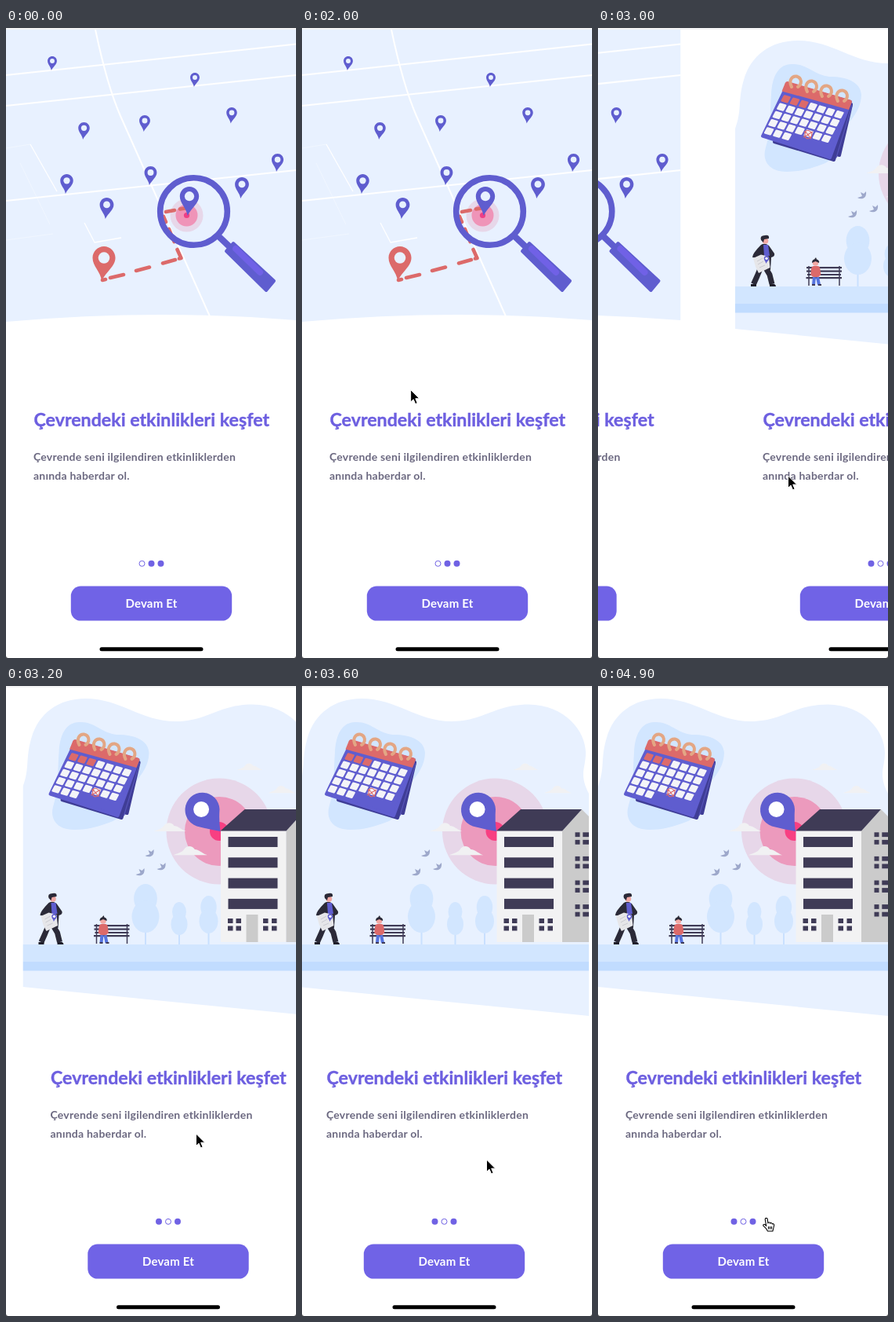
Animation, 370 px wide and 802 px high, one loop 5 s. Source, as an HTML page:

```html
<!DOCTYPE html>
<html lang="tr">
<head>
<meta charset="utf-8">
<title>Onboarding</title>
<style>
html, body { margin: 0; width: 100%; height: 100%; overflow: hidden; background: #fff; }
svg { display: block; }
text { font-family: Lato, "Open Sans", sans-serif; font-weight: 700; }
</style>
</head>
<body>
<svg id="stage" width="370" height="802" viewBox="0 0 370 802"></svg>
<script>
const LOOP = 5000, STEP = 100, GAP = 439.5;
const BLUE = '#5f5dcf', RED = '#dc6a6a', SKY = '#e8f1ff', PALE = '#d2e6ff', INK = '#3f3b56', BLACK = '#2b2a38';

const path = (d, fill) => `<path d="${d}" fill="${fill}"/>`;
const line = (d, color, width, cap = 'butt') =>
  `<path d="${d}" fill="none" stroke="${color}" stroke-width="${width}" stroke-linecap="${cap}" stroke-linejoin="round"/>`;
const circle = (x, y, r, fill) => `<circle cx="${x}" cy="${y}" r="${r}" fill="${fill}"/>`;
const rect = (x, y, w, h, fill, r = 0) =>
  `<rect x="${x}" y="${y}" width="${w}" height="${h}" rx="${r}" fill="${fill}"/>`;
const at = (x, y, body, scale = 1) => `<g transform="translate(${x} ${y}) scale(${scale})">${body}</g>`;

// Map pin: centre x, top y, full height
function pin([x, top, h], fill = BLUE, hole = SKY) {
  const r = h / 3.03;
  return at(x, top + r,
    path('M0 -1C.55 -1 1 -.55 1 0C1 .75 .2 1.2 -.2 2.03C-.3 1.2 -1 .75 -1 0C-1 -.55 -.55 -1 0 -1Z', fill) +
    circle(0, 0, 0.5, hole), r);
}

function mapArt() {
  const pins = [[59, 36, 18], [241, 57, 18], [288, 101, 20.5], [177, 111, 21], [99.5, 120, 22],
    [346.5, 160, 23], [184.5, 176, 24], [77.5, 186, 25], [301, 190, 27], [128.5, 216, 27]];
  return path('M0 0H370V372Q190 357 0 374Z', SKY) +
    line('M0 60L370 20.5M0 99L370 60M0 220L370 181', '#fff', 2) +
    line('M114 2C122 40 132 80 146 112L260 367', '#fff', 2) +
    line('M31 148L65 208M100 248L113 273L147 267', '#fff', 1.3) +
    `<g opacity=".35">${line('M0 153L31 148M18 172L56 250M0 270L60 262', '#fff', 1)}</g>` +
    pins.map(p => pin(p)).join('') +
    circle(230.5, 238.5, 21, '#e7d7e9') + circle(230.5, 238.5, 14, '#ef94b8') +
    line('M123 321L127 320M133 318L150 314M166 309L183 304.5M200 299.5L216 295M221 293.5L223.5 293L218.5 282' +
      'M214.5 272L208 256M204 247L201 240M204 234L215 232M222 230.5L229 229.5', RED, 4.6, 'round') +
    circle(230.5, 238.5, 3.6, '#ee3f86') +
    pin([234, 202, 37]) + pin([125, 278, 44], RED) +
    line('M269 263L290 283', BLUE, 8) +
    `<circle cx="239.5" cy="233.5" r="42.8" fill="none" stroke="${BLUE}" stroke-width="7.6"/>` +
    `<path d="M281 284L290 274L342 322L332 334Z" fill="${BLUE}" stroke="${BLUE}" stroke-width="4" stroke-linejoin="round"/>` +
    line('M293 281L324 311', '#7061e6', 8, 'round');
}

function calendar() {
  let cells = '';
  for (let row = 0; row < 5; row++)
    for (let col = 0; col < (row < 4 ? 7 : 3); col++)
      cells += rect(col - 0.4, row - 0.4, 0.8, 0.8, row === 0 && col < 3 ? RED : '#f4f4f8', 0.1);
  const ring = line('M-5 6C-9 -2 -5 -8 1 -7.5C8 -6 9 2 3 6', '#e3a684', 4, 'round');
  const sheet = (d, c) => `<path d="${d}" fill="${c}" stroke="${c}" stroke-width="4" stroke-linejoin="round"/>`;
  return path('M72 46C92 45 100 60 120 62C145 62 160 70 161 85C160 110 143 118 137 135C133 150 132 163 115 172' +
      'C95 180 80 183 66 183C42 183 34 168 39 152C46 130 44 110 46 85C47 62 55 46 72 46Z', PALE) +
    sheet('M70 74L148 98L133 162L60 142Z', '#3f3d96') +
    sheet('M70 74L148 97L126 168L50 145Z', '#3f3d96') +
    line('M149 98L129 165', '#5654b8', 1.2) +
    sheet('M67 71L147 94L121 165L35 137.5Z', BLUE) +
    path('M67 68Q64 68 63 72L59.5 80.5L145 104L149 94Q149 92 147 91.5Z', RED) +
    `<g transform="matrix(11.3 3.3 -5.4 10.25 64.7 90.3)">${cells}</g>` +
    line('M87 139L99 132M89 131L97 141M88 133Q93 127 98 134Q98 141 92 141Q87 139 90 132', RED, 1.2) +
    [[77, 69], [97, 75], [116, 81], [136, 87]].map(([x, y]) => at(x, y, ring)).join('');
}

function building() {
  const wall = '#cbcbcb';
  let s = path('M252.5 184H336V326H252.5Z', '#f2f2f3') +
    path('M336 184L361 157L370 166V326H336Z', wall) +
    path('M252 184.5L283 157H361L336 184.5Z', INK) + rect(285, 291, 15, 35, wall);
  for (let i = 0; i < 4; i++) {
    s += rect(262, 192 + i * 26.3, 63, 13, INK);
    for (const dy of [0, 9.6])
      s += rect(352.5, 186.3 + i * 30.6 + dy, 6, 5.8, INK) + rect(362.3, 186.3 + i * 30.6 + dy, 7.7, 5.8, INK);
  }
  for (const x of [261.5, 272, 306.5, 317.5])
    for (const y of [296, 305.5]) s += rect(x, y, 6.5, 6, INK);
  return s;
}

function tree(x, top, bottom, half) {
  const h = bottom - top, e = (cy, rx, ry) => `<ellipse cx="${x}" cy="${cy}" rx="${rx}" ry="${ry}" fill="${PALE}"/>`;
  return line(`M${x} ${top + h / 2}V329`, '#c9e0ff', 2) +
    e(top + h * 0.3, half * 0.85, h * 0.3) + e(top + h * 0.67, half, h * 0.33);
}

function walker() {
  return line('M33 304L28 316L23.5 326', BLACK, 7) + line('M38 304L44 314L47 326', BLACK, 7) +
    path('M20 326H27V329H20ZM44 326H50Q52 327 52 329H44Z', '#1f1e2a') +
    path('M33 276Q38 273 43 277L50 287Q51 291 46 292L45 308H29Q28 298 30 293L22 292Q22 287 33 276Z', BLACK) +
    path('M36 276L42 276L44 290H37Z', BLUE) +
    circle(38.5, 271, 3.8, '#f2a9a4') +
    path('M33 270Q31 264 38 264Q44 263 43 268L37 269L36 273Z', BLACK) +
    path('M23 293L33 288.5L43 291L44.5 305L30 312L26 304Z', '#e6e6e9') +
    line('M28 297L35 293M29 301L36 297M31 305L38 302', '#c9c9d0', 1) +
    pin([40, 290, 10], BLUE, '#fff');
}

function bench() {
  return rect(91, 304, 45, 2.2, INK) + rect(91, 308.5, 45, 2.2, INK) + rect(92, 313, 43, 2, INK) +
    rect(90.5, 317, 45.5, 2.2, INK) +
    line('M94 303V328M133 303V328', INK, 1.5) +
    line('M101 317L100 327M105 317L107 327', '#5674de', 4) +
    rect(97.5, 303, 10.5, 14, RED, 3) + line('M98.5 306L97.5 314M107 306L108 314', RED, 2.5, 'round') +
    circle(102.5, 299, 3.8, '#f2a9a4') +
    path('M98 299Q98 295 101 294.5L103 292L104 294.5Q108 296 107 299L102.5 297Z', BLACK) +
    rect(98, 326, 4, 2, INK) + rect(106, 326, 4, 2, INK);
}

function cityArt() {
  const cloud = path('M-20 5C-13 2 -10 2 -7 -2C-4 -7 3 -7 6 -2C11 -2 14 2 21 5Z', '#f1f1f3');
  const bird = path('M-6 3Q-2 2 0 1L-2 -4L2 -2L5 -5Q6 2 1 4Q-3 5 -6 3Z', '#9da8cb');
  return path('M0 383V128C9 105 3 92 11 66C20 35 45 16 80 16C125 16 150 45 195 45C235 45 250 23.5 293 23.5' +
      'C340 24 366 58 366 85C366 105 357 112 370 137V420Z', SKY) +
    calendar() +
    circle(250.5, 185, 67.5, '#e7d7e9') + circle(250.5, 185, 44, '#ec9abd') + circle(250.5, 185, 12, '#f83f82') +
    at(187, 180, cloud) + at(213, 210, cloud, 1.05) + at(289, 103, cloud, 0.8) + at(330, 132, cloud, 0.85) +
    [[162, 213], [150, 237], [177, 230]].map(([x, y]) => at(x, y, bird)).join('') +
    path('M252 185Q236 182 226 179.5A22 22 0 1 1 251 157Q250 172 252 185Z', BLUE) + circle(227.6, 157, 10, '#fff') +
    tree(156.5, 252, 314, 17.5) + tree(199.5, 275, 317, 10.5) + tree(237, 267, 315, 12) +
    rect(0, 329, 370, 22, PALE) + rect(0, 351, 370, 11.5, '#c1dcff') +
    building() + walker() + bench();
}

function page(id, art, current) {
  const label = (x, y, size, fill, str, extra = '') =>
    `<text x="${x}" y="${y}" font-size="${size}" fill="${fill}" ${extra}>${str}</text>`;
  const dots = [0, 1, 2].map(i => i === current
    ? `<circle cx="${173.5 + 12 * i}" cy="681.8" r="3.5" fill="#fff" stroke="#7062e4"/>`
    : circle(173.5 + 12 * i, 681.8, 4, '#7062e4')).join('');
  return `<svg id="${id}" width="370" height="802">${art}` +
    label(35.5, 506.5, 23.2, '#6d5fe0', 'Çevrendeki etkinlikleri keşfet', 'stroke="#6d5fe0" stroke-width=".4"') +
    label(35, 551.3, 14, '#6b6880', 'Çevrende seni ilgilendiren etkinliklerden', 'letter-spacing=".22"') +
    label(35, 575.3, 14, '#6b6880', 'anında haberdar ol.', 'letter-spacing=".22"') +
    dots + rect(82.8, 710.6, 205.4, 44, '#7063e6', 12.5) +
    label(185.5, 738.3, 15, '#fff', 'Devam Et', 'text-anchor="middle" letter-spacing=".2"') +
    rect(119.5, 788.3, 132, 5, '#000', 2.5) + '</svg>';
}

const $ = id => document.getElementById(id);
$('stage').innerHTML = page('first', mapArt(), 0) + page('second', cityArt(), 1) +
  rect(0, 0, 370, 2, '#f3f3f4') + path('M0 799.5Q.5 801.5 2.5 802H0ZM370 799.5Q369.5 801.5 367.5 802H370Z', '#555') +
  `<path id="arrow" d="M0 0V15.5L3.6 12.2L6 18L8.6 17L6.2 11.2H11.2Z" fill="#000" stroke="#fff"/>` +
  `<path id="hand" d="M-1.3 2C-1.3 -.2 1.7 -.2 1.8 2L2.4 7C2.6 5.4 5 5.4 5.2 7.2C5.6 6 7.6 6.2 7.8 8C8.8 7 10.3 7.6 10.2 9.5` +
  `L9.4 13L8.4 17H2L0 13.7L-3.6 10.2C-4.4 8.5 -2.4 7.5 -.9 9.2L.2 10.4ZM3 11V14.5M5 11V14.5M7 11V14.5" ` +
  `fill="#fff" stroke="#000" stroke-width="1.1" stroke-linejoin="round"/>`;

// Keys are [time, value...]
const slide = [[2800, 0], [2900, 115], [3000, 264.5], [3100, 363], [3200, 418], [3350, 441],
  [3480, 445], [3600, 443.5], [3900, 440.5], [4200, GAP]];
const pointer = [[1800, 28, 249], [1950, 105, 405], [2100, 205, 560], [2200, 227, 577], [2300, 237, 574],
  [2500, 242.5, 570], [3350, 242.5, 570], [3600, 235.5, 603], [3800, 223, 650], [4000, 214.5, 675], [4200, 214.5, 677]];

// Smooth curve through the keys
function track(keys, t, n = 1) {
  const last = keys.length - 1;
  if (t <= keys[0][0]) return keys[0][n];
  if (t >= keys[last][0]) return keys[last][n];
  const i = keys.findIndex(k => k[0] > t) - 1, a = keys[i], b = keys[i + 1];
  const slope = j => {
    if (j === 0 || j === last) return 0;
    const p = keys[j - 1], q = keys[j + 1], k = keys[j];
    return (k[n] - p[n]) * (q[n] - k[n]) <= 0 ? 0 : (q[n] - p[n]) / (q[0] - p[0]);
  };
  const d = b[0] - a[0], u = (t - a[0]) / d, v = 1 - u;
  return v * v * (1 + 2 * u) * a[n] + u * u * (1 + 2 * v) * b[n] +
    d * u * v * (v * slope(i) - u * slope(i + 1));
}

function draw(time) {
  const t = Math.floor(time % LOOP / STEP) * STEP;
  const offset = track(slide, t), x = track(pointer, t, 1), y = track(pointer, t, 2);
  $('first').setAttribute('x', -offset);
  $('second').setAttribute('x', GAP - offset);
  const shown = t < 1800 ? '' : y > 660 ? 'hand' : 'arrow';
  for (const id of ['arrow', 'hand']) {
    $(id).setAttribute('transform', `translate(${x} ${y})`);
    $(id).setAttribute('visibility', id === shown ? 'visible' : 'hidden');
  }
}

const start = performance.now();
function tick(now) {
  draw(Math.max(0, now - start));
  requestAnimationFrame(tick);
}
draw(0);
requestAnimationFrame(tick);
</script>
</body>
</html>
```
